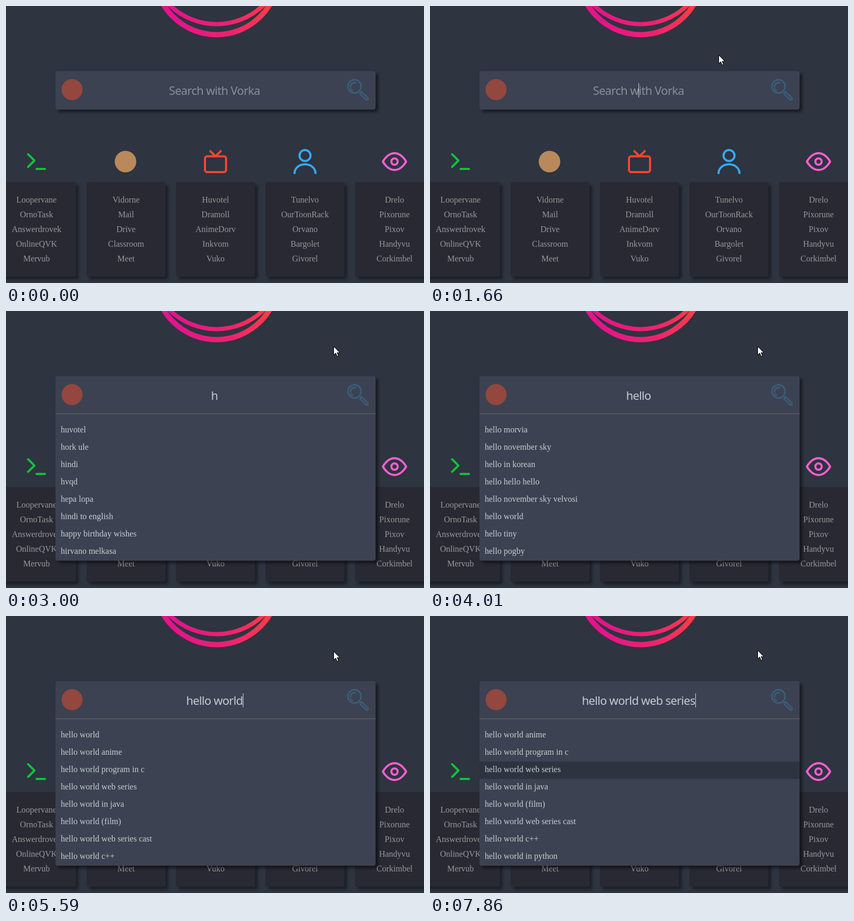
An HTML page for the animation above (8000 ms loop, 794 by 527 pixels).

```html
<!DOCTYPE html>
<html lang="en">
<head>
<meta charset="utf-8">
<title>Start page search</title>
<style>
  html, body { margin: 0; width: 100%; height: 100%; overflow: hidden; background: #2e3440; }
  #stage { position: relative; width: 794px; height: 527px; overflow: hidden;
           font: 16px "Liberation Serif", "Times New Roman", serif; }
  #stage > * { position: absolute; }
  svg { left: 0; top: 0; fill: none; overflow: visible; }
  .card { top: 335px; width: 150px; height: 140px; padding: 20px 0; border-radius: 3px;
          background: #282933; color: #999799; text-align: center; line-height: 28px;
          white-space: pre; box-shadow: 5px 5px 5px #0006; }
  #panel { left: 94px; top: 124px; width: 608px; height: 73px; border-radius: 4px; overflow: hidden;
           background: #3c4251; box-shadow: 5px 5px 5px #0007; }
  #panel.open { height: 351px; }
  #rows { margin-top: 71px; padding-top: 15px; border-top: 1px solid #666a6b; color: #c4d0d2; }
  #panel:not(.open) #rows { display: none; }
  #rows div { height: 33px; line-height: 29px; padding-left: 10px; white-space: pre; }
  #rows .selected { background: #2e3340; }
  .field { left: 0; top: 147px; width: 792px; height: 27px; line-height: 27px; text-align: center;
           font-family: "Noto Sans", sans-serif; font-size: 22px; letter-spacing: -.7px; color: #868f99; }
  #typed { display: inline-block; vertical-align: top; height: 27px; white-space: pre; color: #c3ccd2;
           border-right: 1px solid transparent; margin-right: -1px; }
  #typed.caret { border-color: #d0d8dc; }
</style>
</head>
<body>
<div id="stage">
  <svg width="794" height="527" stroke-width="4" stroke-linecap="round" stroke-linejoin="round">
    <linearGradient id="glow" gradientUnits="userSpaceOnUse" x1="290" y1="30" x2="510" y2="0">
      <stop offset=".15" stop-color="#e4148a"/>
      <stop offset=".6" stop-color="#ee2270"/>
      <stop offset="1" stop-color="#ff4040"/>
    </linearGradient>
    <g stroke="url(#glow)">
      <circle cx="400" cy="-63" r="117.500" stroke-width="10"/>
      <circle cx="400" cy="-93" r="127.500" stroke-width="8"/>
    </g>
    <path stroke="#0cc43a" d="M42 282L54 294L42 306M58 310H74"/>
    <circle cx="227" cy="296" r="20.500" fill="#b9895c"/>
    <g stroke="#fa4430">
      <rect x="378" y="286" width="40" height="30" rx="4"/>
      <path d="M388 276L398 286L408 276"/>
    </g>
    <g stroke="#39a9f4" stroke-linecap="butt">
      <circle cx="568" cy="284.500" r="10.500"/>
      <path d="M548 319.500C548 295 588 295 588 319.500"/>
    </g>
    <g stroke="#ff60d0">
      <path d="M716 296S724 280 738 280S760 296 760 296S752 312 738 312S716 296 716 296Z"/>
      <circle cx="738" cy="296" r="6"/>
    </g>
  </svg>

  <div id="panel"><div id="rows"></div></div>
  <svg width="794" height="200">
    <circle cx="125.500" cy="159" r="20" fill="#93473e"/>
    <g stroke="#3a5d79" stroke-width="3" stroke-linecap="round" stroke-linejoin="round">
      <circle cx="662" cy="153" r="12.500"/>
      <path d="M654.500 154A7.500 7.500 0 0 1 664 146"/>
      <path d="M654.500 157.500A9 9 0 0 0 658 160.500"/>
      <path d="M672 166.500L683.500 178Q685.500 179.500 687 178Q688.500 176 687 174.500L675 163Z"/>
    </g>
  </svg>
  <div class="field" id="hint">Search with Vorka</div>
  <div class="field"><span id="typed"></span></div>
  <svg id="pointer" width="14" height="22">
    <path id="arrow" fill="#fff" stroke="#000" d="M.5 .5V16.500L4.300 13L7 19.300L9.500 18.200L6.900 12.200H12Z"/>
    <path id="beam" stroke="#d8dce2" d="M0 .5H3M4 .5H7M3.500 1V15M0 15.500H3M4 15.500H7"/>
  </svg>
</div>

<script>
const $ = id => document.getElementById(id);
const LOOP = 8000;

const cards = [
  'Loopervane OrnoTask Answerdrovek OnlineQVK Mervub',
  'Vidorne Mail Drive Classroom Meet',
  'Huvotel Dramoll AnimeDorv Inkvom Vuko',
  'Tunelvo OurToonRack Orvano Bargolet Givorel',
  'Drelo Pixorune Pixov Handyvu Corkimbel'
];
cards.forEach((names, i) => {
  const card = document.createElement('div');
  card.className = 'card';
  card.style.left = -17 + 170 * i + 'px';
  card.textContent = names.replaceAll(' ', '\n');
  $('panel').before(card);
});

const list = (prefix, endings) => endings.split('|').map(end => prefix + end);
const worldEndings = '| anime| program in c| web series| in java| (film)| web series cast| c++| in python';
const world = list('hello world', worldEndings);
const suggestions = {
  none: [],
  h: list('h', 'uvotel|ork ule|indi|vqd|epa lopa|indi to english|appy birthday wishes|irvano melkasa'),
  he: list('he', 'llo|art emoji|alth insurance|ight converter|licopter|ading|at wave|xadecimal'),
  hell: list('hell', 'o|o in korean|o world|o in french|o november sky|o meaning|o how are you|o in hindi'),
  hello: list('hello ', 'morvia|november sky|in korean|hello hello|november sky velvosi|world|tiny|pogby'),
  w: list('hello w', 'orld|hat are you doing|orld program in c|orld anime|allpaper|elcome|ho are you|inter'),
  world: world.slice(0, 8),
  more: world.slice(1)
};

// Each entry changes part of the state from its time on.
const events = [
  [0, { text: '', list: 'none', caret: false, row: -1 }],
  [1260, { caret: true }], [1800, { caret: false }], [2400, { caret: true }],
  [2930, { text: 'h', caret: false }], [3000, { list: 'h' }],
  [3340, { text: 'he', caret: true }], [3410, { list: 'he' }],
  [3540, { text: 'hel' }], [3610, { text: 'hell' }], [3740, { list: 'hell' }],
  [3870, { text: 'hello' }], [4010, { list: 'hello', caret: false }],
  [4330, { text: 'hello ', caret: true }],
  [4470, { text: 'hello w' }], [4600, { list: 'w' }],
  [4740, { text: 'hello wo' }], [4870, { list: 'world' }],
  [4930, { text: 'hello wor' }], [5060, { text: 'hello worl' }],
  [5590, { text: 'hello world' }], [5720, { list: 'more' }],
  [6130, { caret: false }], [6670, { caret: true }],
  [7070, { text: world[1], row: 0 }], [7200, { caret: false }],
  [7400, { text: world[2], row: 1 }],
  [7730, { text: world[3], row: 2, caret: true }]
];

// Pointer path: step, x, y.
const START = 150, STEP = 68.7;
const path = [
  [0, 783, 497], [2, 738, 440], [5, 706, 320], [8, 736, 160], [10, 757, 86], [11, 718, 88],
  [12, 610, 104], [13, 480, 140], [14, 396, 163], [15, 396, 163], [16, 385, 166],
  [18, 420, 148], [20, 505, 110], [22, 590, 76], [24, 622, 64]
];
const nudges = [[2000, 67], [2730, 66], [2870, 67], [6130, 65], [6470, 67], [7400, 65]];

function pointerAt(t) {
  const nudge = nudges.findLast(n => t >= n[0]);
  if (nudge) return [622, nudge[1]];
  const step = Math.min(24, Math.floor((t - START) / STEP));
  const i = Math.max(1, path.findIndex(p => p[0] >= step));
  const [a, b] = [path[i - 1], path[i]];
  const k = (step - a[0]) / (b[0] - a[0]);
  return [1, 2].map(n => Math.round(a[n] + (b[n] - a[n]) * k));
}

let shownList;
function render(t) {
  const state = {};
  for (const [time, change] of events) if (t >= time) Object.assign(state, change);

  $('hint').hidden = state.text !== '';
  $('typed').textContent = state.text;
  $('typed').classList.toggle('caret', state.caret);

  const rows = $('rows');
  if (shownList !== state.list) {
    shownList = state.list;
    rows.replaceChildren(...suggestions[shownList].map(text => {
      const row = document.createElement('div');
      row.textContent = text;
      return row;
    }));
    $('panel').classList.toggle('open', shownList !== 'none');
  }
  [...rows.children].forEach((row, i) => row.classList.toggle('selected', i === state.row));

  const pointer = $('pointer');
  pointer.style.display = t < START ? 'none' : '';
  if (t >= START) {
    const [x, y] = pointerAt(t);
    const overField = x > 94 && x < 702 && y > 124 && y < 197;
    pointer.style.left = x + 'px';
    pointer.style.top = y + 'px';
    $('beam').style.display = overField ? '' : 'none';
    $('arrow').style.display = overField ? 'none' : '';
  }
}

const begin = performance.now();
function frame() {
  render((performance.now() - begin) % LOOP);
  requestAnimationFrame(frame);
}
frame();
</script>
</body>
</html>
```
